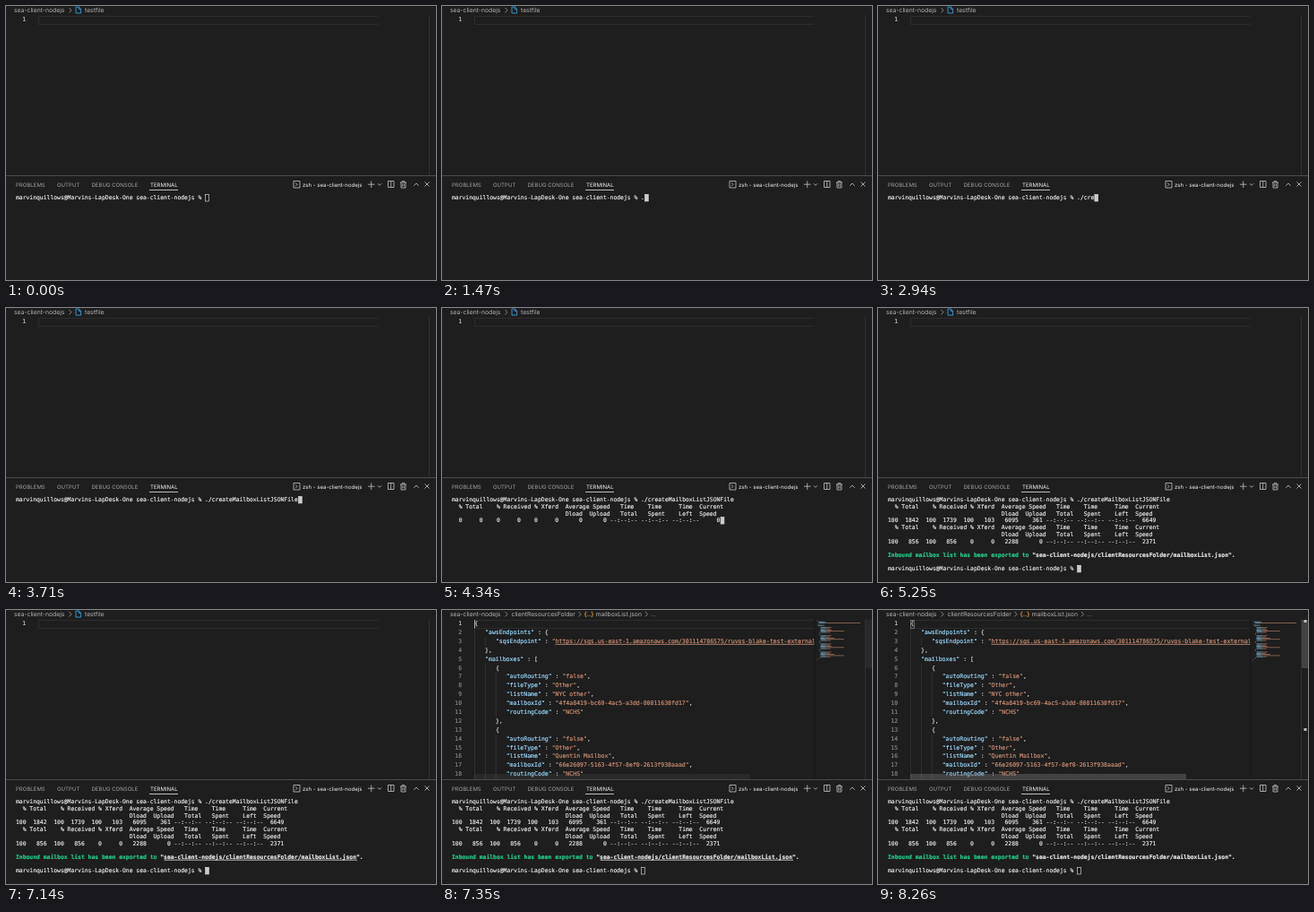
An HTML page for the animation above (8330 ms loop, 480 by 306 pixels).

```html
<!DOCTYPE html>
<html lang="en">
<head>
<meta charset="utf-8">
<title>Exporting a mailbox list</title>
<style>
  html, body { margin: 0; height: 100%; overflow: hidden; background: #1e1e1e; }
  svg { display: block; width: 480px; height: 306px; }
  text { white-space: pre; text-rendering: geometricPrecision; }
  .ui { font: 6.8px Inter, sans-serif; fill: #b4b4b4; }
  .tabs { font-size: 6.05px; fill: #a0a0a0; }
  .tabs .on { fill: #f0f0f0; }
  .icon { fill: none; stroke: #c5c5c5; stroke-width: .8; }
  .sep { fill: none; stroke: #a0a0a0; stroke-width: .8; }
  .mono { font-family: "DejaVu Sans Mono", monospace; }
  .mono text, .mono tspan, #minimap rect { fill: currentColor; }
  .mono text, .mono tspan { stroke: currentColor; stroke-width: .16; }
  #code, #numbers { font-size: 6.53px; color: #d4d4d4; }
  #numbers { color: #858585; text-anchor: end; }
  #term { font-size: 6.39px; color: #ececec; }
  #minimap { color: #a0a0a0; }
  .key { color: #9cdcfe; }
  .str { color: #ce9178; }
  .ok { color: #23d18b; }
  .url { text-decoration: underline .7px; text-underline-offset: 1px; }
</style>
</head>
<body>
<svg viewBox="0 0 480 306">
  <defs>
    <clipPath id="pane"><path d="M0 10H415.500V189H0z"/></clipPath>
  </defs>
  <rect width="480" height="306" fill="#1e1e1e"/>

  <g class="ui">
    <text x="9" y="7">sea-client-nodejs</text>
    <path class="sep" d="M70.500 2l2.500 2.700l-2.500 2.700"/>
    <g id="emptyCrumb">
      <path d="M78 1h3.400l2.200 2.200v4.800h-5.600zM81.200 1v2.400h2.400" fill="none" stroke="#3b9fd6" stroke-width=".9"/>
      <text x="88" y="7">testfile</text>
    </g>
    <g id="jsonCrumb">
      <text x="77.500" y="7">clientResourcesFolder</text>
      <path class="sep" d="M152.500 2l2.500 2.700l-2.500 2.700M227 2l2.500 2.700l-2.500 2.700"/>
      <text x="158.500" y="7" fill="#d98a3d" font-weight="700">{..}</text>
      <text x="171.500" y="7">mailboxList.json</text>
      <text x="233" y="7">...</text>
    </g>
  </g>

  <path d="M36 11.500H415.500M36 20.500H415.500M36.500 11V21" stroke="#2c2c2c" fill="none"/>
  <path d="M472.500 10V189" stroke="#303030"/>
  <g id="numbers" class="mono" clip-path="url(#pane)"></g>
  <g id="json">
    <path d="M416 11V189" stroke="#171717"/>
    <g id="guides" stroke="#404040" stroke-width=".6"></g>
    <g id="code" class="mono" clip-path="url(#pane)"></g>
    <g id="minimap" opacity=".7"></g>
    <g id="scrollbars" fill="#797979" fill-opacity=".4">
      <rect x="36" y="183" width="308" height="6"/>
      <rect x="473" y="11" width="7" height="54"/>
    </g>
    <g id="brackets">
      <rect x="36.500" y="11.500" width="4" height="9" fill="none" stroke="#888888" stroke-width=".7"/>
      <path d="M475.500 11h3v3h-3zM475.500 132h3v3h-3z" fill="#c0c0c0"/>
    </g>
  </g>
  <rect id="caret" x="36" y="11" width="1" height="9.500" fill="#aeafad"/>

  <path d="M0 189.500H480" stroke="#4b4b4b"/>
  <g class="ui tabs">
    <text x="11" y="201.500">PROBLEMS</text>
    <text x="57" y="201.500">OUTPUT</text>
    <text x="95.500" y="201.500">DEBUG CONSOLE</text>
    <text x="161" y="201.500" class="on">TERMINAL</text>
    <text x="331" y="201.500" class="on">zsh - sea-client-nodejs</text>
  </g>
  <path d="M160 205.500H192" stroke="#e7e7e7" stroke-width=".8"/>
  <g class="icon">
    <path d="M321 195.500h7v7.500h-7zM323 197.300l2 2l-2 2"/>
    <path d="M404 199.200h7.500M407.750 195.500v7.500M415 198.300l2 2l2-2"/>
    <path d="M426.500 195.500h6.500v7h-6.500zM429.750 195.500v7"/>
    <path d="M440 197h7M442.200 197v-1.400h2.600v1.400M441 197v6h5v-6M442.700 198.500v3M444.300 198.500v3"/>
    <path d="M455.300 200.800l2.700-2.800l2.700 2.800M467.500 196.500l5 5M472.500 196.500l-5 5"/>
  </g>

  <g id="term" class="mono">
    <g id="rows"></g>
    <text id="message" x="11" y="277.900" font-weight="700"><tspan class="ok">Inbound mailbox list has been exported to </tspan>"sea-client-nodejs/clientResourcesFolder/mailboxList.json".</text>
    <path id="link" d="M176.500 279.200H392" stroke="#e8e8e8" stroke-width=".8"/>
    <rect id="cursor" width="3.850" height="7.600" stroke="#cccccc" stroke-width=".7"/>
  </g>
</svg>

<script>
const LOOP = 8330, OPEN = 7350;
const TERM = { x: 11, y: 216.3, col: 3.847, line: 7.7 };
const EDIT = { x: 36.3, y: 17.2, col: 3.93, line: 9.88 };
const $ = id => document.getElementById(id);

function add(parent, tag, attrs, text = '') {
  const node = document.createElementNS('http://www.w3.org/2000/svg', tag);
  for (const name in attrs) node.setAttribute(name, attrs[name]);
  node.textContent = text;
  return parent.appendChild(node);
}

// Editor: each line is [indent level, text]
const mailbox = (name, id) => [
  [2, '{'], [3, '"autoRouting" : "false",'], [3, '"fileType" : "Other",'],
  [3, `"listName" : "${name}",`], [3, `"mailboxId" : "${id}",`],
  [3, '"routingCode" : "NCHS"'], [2, '},']
];
const boxes = [
  ['NYC other', '4f4a8419-bc69-4ac5-a3dd-80811638fd17'],
  ['Quentin Mailbox', '66e26097-5163-4f57-8ef0-2613f938aaad']
];
const source = [
  [0, '{'], [1, '"awsEndpoints" : {'],
  [2, '"sqsEndpoint" : "https://sqs.us-east-1.amazonaws.com/301114786575/ruvos-blake-test-external"'],
  [1, '},'], [1, '"mailboxes" : ['],
  ...[0, 1, 0, 1].flatMap(i => mailbox(...boxes[i])),
  [1, ']'], [0, '}']
];

source.forEach(([level, text], i) => {
  const tokens = text.match(/"[^"]*"|[^"]+/g);
  const y = EDIT.y + i * EDIT.line;
  const shown = i < 18;
  const line = shown && add($('code'), 'text', { x: EDIT.x + level * 3 * EDIT.col, y });
  let column = level * 3;
  tokens.forEach((token, k) => {
    const kind = token[0] !== '"' ? '' : k ? 'str' : 'key';
    if (shown && token.startsWith('"http')) {
      add(line, 'tspan', { class: 'str' }, '"');
      add(line, 'tspan', { class: 'str url' }, token.slice(1));
    } else if (shown) add(line, 'tspan', { class: kind }, token);
    if (token.trim()) add($('minimap'), 'rect', {
      x: 418 + column * .5, y: 11.5 + i * 1.3, width: token.length * .5, height: .8, class: kind
    });
    column += token.length;
  });
  if (!shown) return;
  for (let g = 0; g < level; g++) {
    const x = EDIT.x + g * 3 * EDIT.col + .3;
    add($('guides'), 'path', { d: `M${x} ${y - 6.6}V${Math.min(y + 3.3, 189)}` });
  }
});
const numbers = Array.from({ length: 18 }, (_, i) =>
  add($('numbers'), 'text', { x: 22.2, y: EDIT.y + i * EDIT.line }, i + 1));
numbers[0].style.color = '#c6c6c6';

// Terminal: [time, row, text]; the cursor follows the latest entry
const prompt = 'marvinquillows@Marvins-LapDesk-One sea-client-nodejs % ';
const header = '  % Total    % Received % Xferd  Average Speed   Time    Time     Time  Current';
const header2 = ' '.repeat(33) + 'Dload  Upload   Total   Spent    Left  Speed';
const stats = (...values) => {
  const cells = values.map((v, i) => String(v).padStart([3, 6, 5, 6, 5, 6, 7, 7, 6][i]));
  return cells.slice(0, 8).join('') + ' --:--:--'.repeat(3) + cells[8];
};
const zeros = stats(0, 0, 0, 0, 0, 0, 0, 0, 0);
const command = './createMailboxListJSONFile';
const typing = [[0, 0], [1470, 1], [1960, 2], [2240, 3], [2520, 4], [2940, 5], [3220, command.length]];
const events = [
  ...typing.map(([at, n]) => [at, 0, prompt + command.slice(0, n)]),
  [4200, 1, ''],
  [4270, 1, header], [4270, 2, header2], [4270, 3, zeros],
  [4550, 3, stats(100, 1842, 100, 1739, 100, 103, 6095, 361, 6649)], [4550, 4, ''],
  [4690, 4, header], [4690, 5, header2], [4690, 6, zeros],
  [5110, 6, stats(100, 856, 100, 856, 0, 0, 2288, 0, 2371)],
  [5110, 10, prompt]
];
const rows = Array.from({ length: 11 }, (_, i) =>
  add($('rows'), 'text', { x: TERM.x, y: TERM.y + i * TERM.line }));

const show = (node, on) => { node.style.display = on ? '' : 'none'; };

function render(t) {
  const past = events.filter(([at]) => at <= t);
  const lines = [];
  for (const [, row, text] of past) lines[row] = text;
  rows.forEach((node, i) => {
    const text = lines[i] || '';
    if (node.textContent !== text) node.textContent = text;
  });

  const [, row, text] = past[past.length - 1];
  const open = t >= OPEN;
  $('cursor').setAttribute('x', TERM.x + text.length * TERM.col);
  $('cursor').setAttribute('y', TERM.y - 5.9 + row * TERM.line);
  $('cursor').setAttribute('fill', t >= 560 && !open ? '#cccccc' : 'none');

  show($('message'), t >= 5110);
  show($('link'), t >= 6720 && t < 7840);
  show($('emptyCrumb'), !open);
  show($('jsonCrumb'), open);
  show($('json'), open);
  show($('brackets'), t >= OPEN + 70);
  show($('caret'), open && t < 7840);
  $('scrollbars').setAttribute('opacity', Math.min(1, Math.max(0, .3 + (t - OPEN) / 150)));
  numbers.forEach((node, i) => show(node, open || i === 0));
}

const start = performance.now();
function tick() {
  render((performance.now() - start) % LOOP);
  requestAnimationFrame(tick);
}
tick();
</script>
</body>
</html>
```
